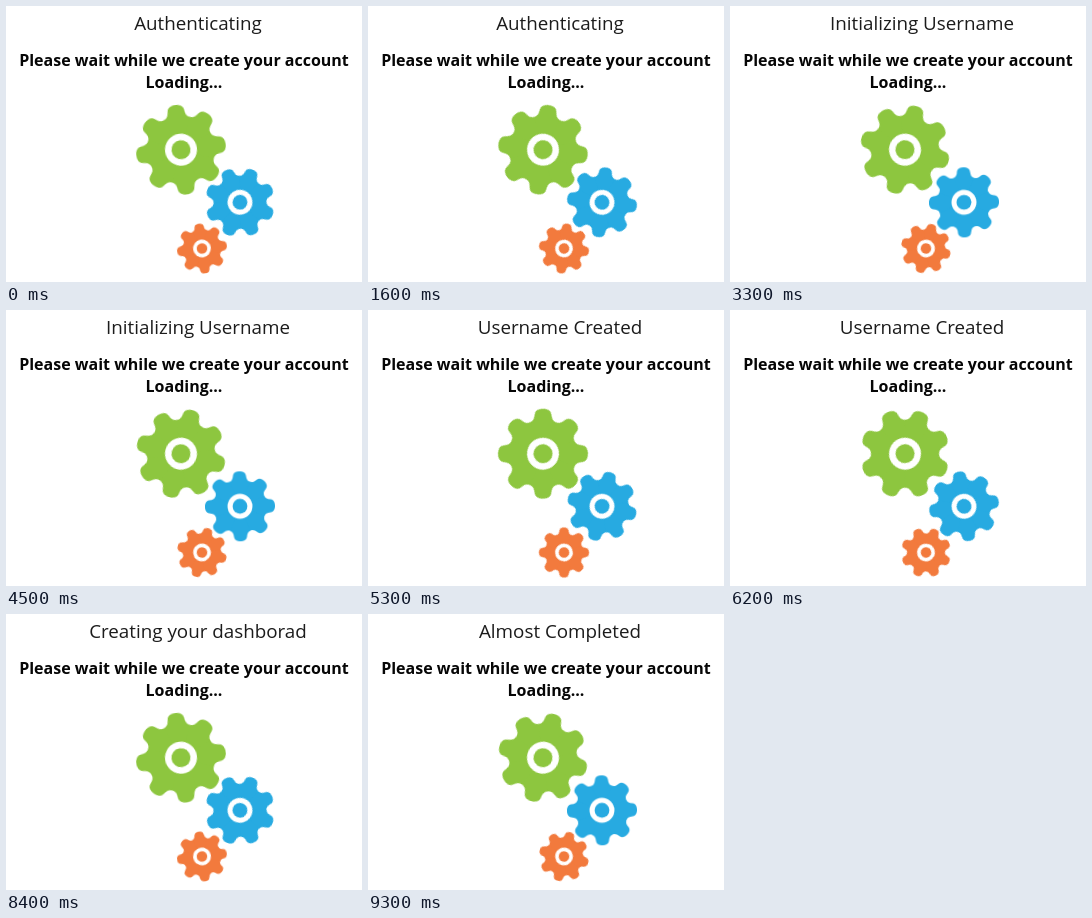
Write an HTML page that moves like this. It is 356x276 px and loops after 9400 ms.

```html
<!DOCTYPE html>
<html lang="en">
<head>
<meta charset="utf-8">
<title>Loading</title>
<style>
  html, body { margin: 0; width: 100%; height: 100%; overflow: hidden; background: #fff; }
  svg { display: block; }
  text { font-family: "Open Sans", sans-serif; text-anchor: middle; }
  .status { font-size: 18.8px; fill: #1c1c1c; animation: status 9.4s step-end infinite; }
  .note { font-size: 16px; font-weight: 700; fill: #060606; }
  .spin { animation: spin 9.4s steps(94) infinite; }

  /* 7.5 degrees every 100 ms, restarting with the loop */
  @keyframes spin {
    from { transform: rotate(var(--from)); }
    to { transform: rotate(calc(var(--from) + var(--turn))); }
  }
  .ccw { --from: -7.5deg; --turn: -705deg; }
  .cw { --from: 21.5deg; --turn: 705deg; }

  @keyframes status {
    0% { transform: translateY(0); }
    29.787% { transform: translateY(-40px); }
    51.064% { transform: translateY(-80px); }
    72.34% { transform: translateY(-120px); }
    93.617%, 100% { transform: translateY(-160px); }
  }
</style>
</head>
<body>
<svg width="356" height="276" viewBox="0 0 356 276">
  <defs>
    <path id="tooth" d="M0 0L-13-31.4C-9.8-32.7-8.8-35-8.3-39.5C-7.6-43.6-4-45 0-45C4-45 7.6-43.6 8.3-39.5C8.8-35 9.8-32.7 13-31.4Z"/>
    <g id="pair">
      <use href="#tooth"/>
      <use href="#tooth" transform="rotate(180)"/>
    </g>
    <g id="gear">
      <circle r="33.5"/>
      <use href="#pair"/>
      <use href="#pair" transform="rotate(45)"/>
      <use href="#pair" transform="rotate(90)"/>
      <use href="#pair" transform="rotate(135)"/>
      <circle r="16" fill="#fff"/>
      <circle r="9.5"/>
    </g>
  </defs>

  <svg width="356" height="40" overflow="hidden">
    <g class="status">
      <text x="192" y="24">Authenticating</text>
      <text x="192" y="64">Initializing Username</text>
      <text x="192" y="104">Username Created</text>
      <text x="192" y="144">Creating your dashborad</text>
      <text x="192" y="184">Almost Completed</text>
    </g>
  </svg>

  <text class="note" x="178" y="60">Please wait while we create your account</text>
  <text class="note" x="178" y="82">Loading...</text>

  <g transform="translate(175 143.7)" fill="#8dc63f">
    <g class="spin ccw"><use href="#gear"/></g>
  </g>
  <g transform="translate(234 196.3) scale(.778)" fill="#27aae1">
    <g class="spin cw"><use href="#gear"/></g>
  </g>
  <g transform="translate(196 242.5) scale(.556)" fill="#f27a3d">
    <g class="spin ccw"><use href="#gear"/></g>
  </g>
</svg>
</body>
</html>
```
